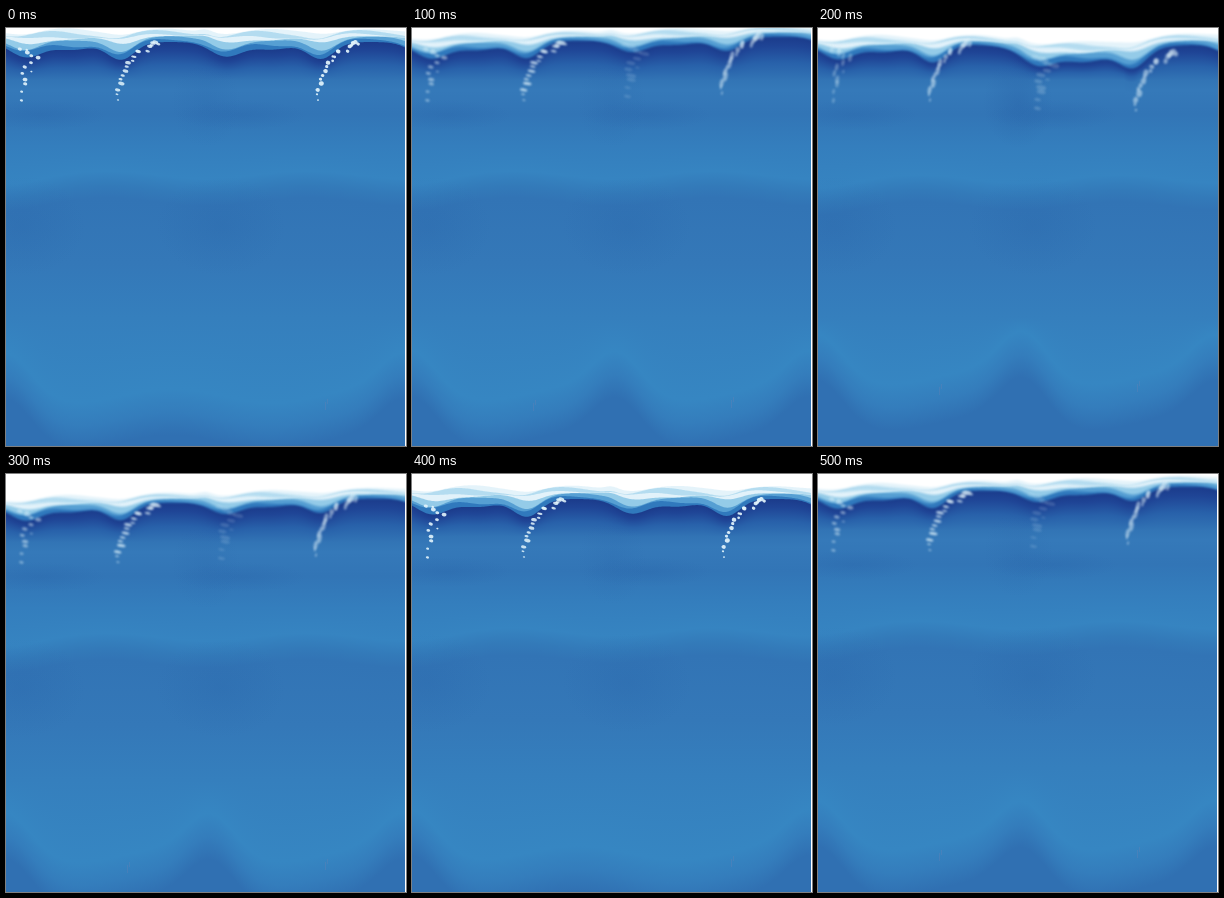
These frames come from a looping animation (400x418 px, 600 ms). An HTML page with a canvas:

```html
<!DOCTYPE html>
<html lang="en">
<head>
<meta charset="utf-8">
<title>Water</title>
<style>
html, body { margin: 0; width: 100%; height: 100%; overflow: hidden; background: #3478b8; }
canvas { display: block; }
</style>
</head>
<body>
<canvas id="stage" width="400" height="418"></canvas>
<script>
const W = 400, H = 418, TILE = 200, DEPTH = 500, STEP = 100;

const bump = (d, w) => Math.exp(-((d / w) ** 2));
// Bump repeated once per tile
const repeat = (x, at, w) => {
  const d = (((x - at) % TILE) + TILE * 1.5) % TILE - TILE / 2;
  return bump(d, w);
};
const wave = x => Math.cos(x * 2 * Math.PI / TILE);

// sky: foam top, sea: foam bottom, slopes per pixel, roll: bulge of the right half, mid: central mound
const calm = { sky: 2, skySlope: 0, sea: 14, seaSlope: 0, fade: .1, roll: 0, mid: 0, band: 159, floor: 386, blur: 0, rim: true };
const swell = { sky: 8, skySlope: -.026, sea: 16, seaSlope: -.02, fade: .35, roll: 0, mid: 40, band: 159, floor: 384, blur: .9, rim: true };
const twin = { sky: 9, skySlope: -.01, sea: 16, seaSlope: 0, fade: 0, roll: 10, mid: 44, band: 163, floor: 368, blur: .9, rim: false };

const timeline = [[calm, 0], [swell, 0], [twin, 0], [swell, 16], [calm, 11], [swell, 4]];

const roll = (p, x) => p.roll * bump(x - 265, 70);
const sky = (p, x) => p.sky + p.skySlope * x + 1.5 * wave(x * 2) - 3 * bump(x - TILE, 9) + roll(p, x) * .8;
const dips = x => 15 * repeat(x, 20, 22) + 8 * repeat(x, 66, 28) + 18 * repeat(x, 115, 19);
const sea = (p, x) => p.sea + p.seaSlope * x + dips(x) * (1 - p.fade * x / W) + roll(p, x);
const band = (p, x) => p.band + 4 * wave(x) + 5 * bump(x, 40);
const floor = (p, x) => p.floor + 7 * wave(x - 65) - 40 * (bump(x, 35) + bump(x - W, 35)) - p.mid * bump(x - 205, 34);

const foam = [[1, '#3079bd'], [.82, '#569fd3'], [.64, '#94cbe8'], [.48, '#e2f2fa'], [.36, '#b4dcf0'], [.2, '#e4f3fa'], [.05, '#fff']];

function random(seed) {
  return () => (seed = seed * 16807 % 2147483647) / 2147483647;
}

// Bubbles scattered along a quadratic path, thinning out downwards
function stream(seed, n, [x0, y0], [x1, y1], [x2, y2], spread) {
  const rnd = random(seed);
  return Array.from({ length: n }, (_, i) => {
    const u = (i / (n - 1)) ** 1.5, v = 1 - u, s = spread * (1.2 - u);
    return {
      x: v * v * x0 + 2 * u * v * x1 + u * u * x2 + (rnd() - .5) * s,
      y: v * v * y0 + 2 * u * v * y1 + u * u * y2 + (rnd() - .5) * s * .6,
      r: .8 + rnd() * 1.5
    };
  });
}
const drip = stream(71, 13, [24, 23], [24, 40], [14, 72], 17);
const trail = stream(409, 22, [152, 13], [112, 32], [112, 72], 9);

function water(c, p, dy) {
  for (let x = 0; x < W; x++) {
    const s = sea(p, x) + dy, b = band(p, x) + dy, f = floor(p, x) + dy;
    const e = Math.max(dy + 52, s + 14);
    const g = c.createLinearGradient(0, 0, 0, DEPTH);
    const stops = [
      [s, '#1b3b8b'], [s + (e - s) * .22, '#1f4596'], [s + (e - s) * .6, '#2861aa'], [e, '#3274b5'],
      [e + 10, '#3579b9'], [dy + 86, '#3275b6'], [dy + 118, '#347ebd'], [b - 12, '#3684c1'],
      [b + 3, '#337ab9'], [b + 15, '#3274b5'], [dy + 235, '#3478b8'], [dy + 290, '#357fbd'],
      [f - 18, '#3686c2'], [f + 5, '#347dbc'], [f + 28, '#3070b2']
    ];
    for (const [y, color] of stops) g.addColorStop(Math.min(1, y / DEPTH), color);
    c.fillStyle = g;
    c.fillRect(x, 0, 1, H);
  }
}

function shadow(c, x, y, rx, ry, alpha) {
  c.save();
  c.translate(x, y);
  c.scale(rx, ry);
  const g = c.createRadialGradient(0, 0, 0, 0, 0, 1);
  g.addColorStop(0, `rgba(38,96,166,${alpha})`);
  g.addColorStop(1, 'rgba(38,96,166,0)');
  c.fillStyle = g;
  c.fillRect(-1, -1, 2, 2);
  c.restore();
}

function shadows(c, p, dy) {
  for (let x = 0; x < W; x += TILE) {
    shadow(c, x + 15, dy + 198, 65, 50, .2);
    shadow(c, x + 35, dy + 87, 65, 15, .25);
  }
  shadow(c, TILE, dy + 75, 35, 45, .15 + p.roll * .02);
}

function crest(c, p, dy) {
  c.save();
  if (p.blur) c.filter = `blur(${p.blur}px)`;
  for (const [k, color] of foam) {
    c.beginPath();
    c.moveTo(-9, -20);
    for (let x = -9; x <= W + 9; x++) {
      const px = Math.max(0, Math.min(W, x)), top = sky(p, px);
      const ripple = k < 1 ? Math.sin(px * .06 + k * 11) * .09 : 0;
      c.lineTo(x, dy + top + Math.max(2, sea(p, px) - top) * (k + ripple));
    }
    c.lineTo(W + 9, -20);
    c.fillStyle = color;
    c.fill();
  }
  c.restore();
}

function drops(c, list, dx, dy, sx, sy, alpha) {
  c.fillStyle = `rgba(226,244,252,${alpha})`;
  for (const { x, y, r } of list) {
    c.beginPath();
    c.ellipse(x + dx, y + dy, r * sx, r * sy, .2, 0, 7);
    c.fill();
  }
}

function bubbles(c, p, dy) {
  c.save();
  if (p.blur) c.filter = 'blur(.8px)';
  if (p === calm) {
    drops(c, drip, 0, dy, 1.2, .9, .9);
    drops(c, trail, 0, dy, 1.4, .8, .85);
    drops(c, trail, TILE, dy, 1.1, 1, .92);
  } else if (p === swell) {
    drops(c, drip, 0, dy, 1.6, .9, .5);
    drops(c, trail, 0, dy, 1.9, .7, .75);
    drops(c, trail, TILE - 2, dy - 7, 1, 2.2, .5);
    drops(c, drip, TILE, dy - 4, 2.6, 1, .16);
  } else {
    drops(c, drip, 0, dy, 1, 2.1, .3);
    drops(c, trail, 0, dy, 1, 2, .5);
    drops(c, trail, TILE + 6, dy + 10, 1.3, 1.6, .5);
    drops(c, drip, TILE + 4, dy + 8, 2.6, 1.2, .2);
  }
  c.restore();
}

function glint(c, x, y) {
  c.fillStyle = 'rgba(120,130,175,.28)';
  c.fillRect(x, y, 1, 8);
  c.fillRect(x + 2, y - 3, 1, 5);
}

function paint([p, dy]) {
  const sheet = document.createElement('canvas');
  sheet.width = W;
  sheet.height = H;
  const c = sheet.getContext('2d');
  water(c, p, dy);
  shadows(c, p, dy);
  crest(c, p, dy);
  bubbles(c, p, dy);
  const low = p.floor + dy - 12;
  glint(c, 319, low);
  if (p !== calm) glint(c, 121, low + 3);
  if (p.rim) {
    c.fillStyle = '#fff';
    c.fillRect(W - 1, 0, 1, H);
  }
  return sheet;
}

const sheets = timeline.map(paint);
const view = document.getElementById('stage').getContext('2d');

function tick() {
  const i = Math.floor(performance.now() / STEP) % sheets.length;
  view.drawImage(sheets[i], 0, 0);
  requestAnimationFrame(tick);
}
tick();
</script>
</body>
</html>
```
